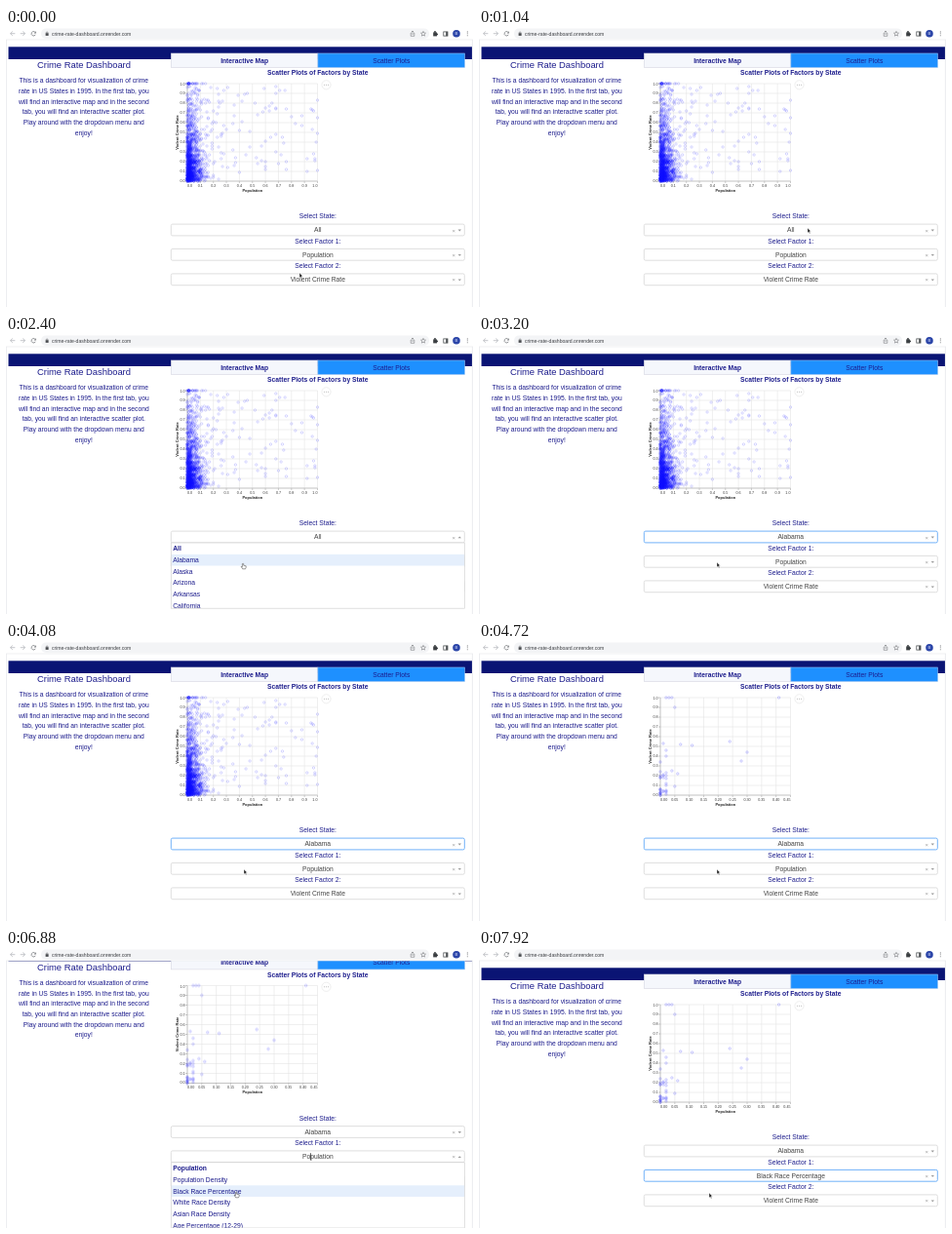
These frames come from a looping animation (479 by 286 pixels, 8000 ms). An HTML page with a canvas:

```html
<!DOCTYPE html>
<html lang="en">
<head>
<meta charset="utf-8">
<title>Crime Rate Dashboard</title>
<style>
html, body { margin: 0; width: 100%; height: 100%; overflow: hidden; background: #fff; }
canvas { display: block; width: 479px; height: 286px; }
</style>
</head>
<body>
<canvas id="stage"></canvas>
<script>
const W = 479, H = 286, LOOP = 8000, SCROLL = 19.5;
const OPEN1 = 1440, PICK1 = 2880, REDRAW = 4320, OPEN2 = 4800, PICK2 = 7280;
const STATUS = [5360, 5840];
const NAVY = '#1c1c8c', SANS = '"Liberation Sans", Arial, sans-serif';
const PLOT = { x: 186, y: 57, w: 133.5, h: 100 };
const STATES = ['All', 'Alabama', 'Alaska', 'Arizona', 'Arkansas', 'California'];
const FACTORS = ['Population', 'Population Density', 'Black Race Percentage',
  'White Race Density', 'Asian Race Density', 'Age Percentage (12-29)'];
const INTRO = ['This is a dashboard for visualization of crime',
  'rate in US States in 1995. In the first tab, you',
  'will find an interactive map and in the second',
  'tab, you will find an interactive scatter plot.',
  'Play around with the dropdown menu and', 'enjoy!'];

// Pointer stops: time, x, y
const PATH = [[0, 301, 251], [160, 301, 251], [960, 337, 205], [1480, 337, 205],
  [2200, 243, 234], [2880, 243, 234], [3040, 244, 233], [4840, 244, 233],
  [5360, 239, 245], [6240, 239, 245], [6800, 236, 249], [7280, 236, 249], [7360, 236, 250], [LOOP, 236, 250]];

const canvas = document.getElementById('stage');
const dpr = window.devicePixelRatio || 1;
canvas.width = W * dpr;
canvas.height = H * dpr;
const ctx = canvas.getContext('2d');

function rng(seed) {
  return () => {
    seed = (seed * 1664525 + 1013904223) >>> 0;
    return (seed + 0.5) / 4294967296;
  };
}

// Most places are small; a thin tail spreads over the whole plot
function allPoints() {
  const rand = rng(1995), pts = [];
  while (pts.length < 1500) {
    const tail = rand() < 0.085;
    const x = tail ? Math.pow(rand(), 1.6) * 1.03 : -Math.log(rand()) * 0.04;
    const y = tail ? 0.08 + rand() * 0.9 : -Math.log(rand()) * 0.25;
    pts.push([Math.min(1, Math.round(x * 100) / 100), Math.min(1, Math.round(y * 100) / 100)]);
  }
  return pts;
}

function statePoints() {
  const rand = rng(42);
  const pts = [[.02, 1], [.03, 1], [.04, 1], [.41, 1], [.05, .9], [.07, .52], [.11, .51], [.24, .55],
    [.28, .35], [.30, .44], [.06, .22], [.04, .25], [.05, .09], [.02, .46], [.01, .53], [.02, .4]];
  for (let i = 0; i < 28; i++) {
    pts.push([Math.floor(rand() * 2.6) / 100, Math.round(rand() * rand() * 40) / 100]);
  }
  return pts;
}

function scatter(pts, max, alpha) {
  const layer = document.createElement('canvas');
  layer.width = canvas.width;
  layer.height = canvas.height;
  const c = layer.getContext('2d');
  c.scale(dpr, dpr);
  c.strokeStyle = `rgba(20, 20, 255, ${alpha})`;
  c.lineWidth = 0.7;
  for (const [x, y] of pts) {
    c.beginPath();
    c.arc(PLOT.x + x / max * PLOT.w, PLOT.y + (1 - y) * PLOT.h, 1.2, 0, 7);
    c.stroke();
  }
  return layer;
}

const charts = {
  all: { max: 1, step: 0.1, digits: 1, layer: scatter(allPoints(), 1, 0.23) },
  state: { max: 0.45, step: 0.05, digits: 2, layer: scatter(statePoints(), 0.45, 0.3) }
};

function text(s, x, y, { size = 6.72, color = NAVY, align = 'center', bold = false } = {}) {
  ctx.font = `${bold ? 'bold ' : ''}${size}px ${SANS}`;
  ctx.fillStyle = color;
  ctx.textAlign = align;
  ctx.textBaseline = 'alphabetic';
  ctx.fillText(s, x, y + size * 0.35);
}

function rect(x, y, w, h, color) {
  ctx.fillStyle = color;
  ctx.fillRect(x, y, w, h);
}

function line(color, width, ...pts) {
  ctx.strokeStyle = color;
  ctx.lineWidth = width;
  ctx.beginPath();
  for (let i = 0; i < pts.length; i += 2) ctx.lineTo(pts[i], pts[i + 1]);
  ctx.stroke();
}

function shape(fill, ...pts) {
  ctx.beginPath();
  for (let i = 0; i < pts.length; i += 2) ctx.lineTo(pts[i], pts[i + 1]);
  ctx.closePath();
  ctx.fillStyle = fill;
  ctx.fill();
}

function disc(x, y, r, fill) {
  ctx.beginPath();
  ctx.arc(x, y, r, 0, 7);
  ctx.fillStyle = fill;
  ctx.fill();
}

function drawToolbar() {
  const ink = '#77797d', pale = '#b4b7bb';
  rect(0, 0, W, 12, '#fff');
  ctx.beginPath();
  ctx.roundRect(36, 0.5, 398, 10.5, 5);
  ctx.fillStyle = '#f3f4f6';
  ctx.fill();
  line('#e4e6e9', 0.6, 0, 12, W, 12);
  for (const [x, d] of [[4.5, 1], [19.5, -1]]) {
    line(pale, 0.8, x, 5.7, x + 4.8 * d, 5.7);
    line(pale, 0.8, x + 2.3 * d, 3.5, x, 5.7, x + 2.3 * d, 7.9);
  }
  ctx.strokeStyle = ink;
  ctx.lineWidth = 0.8;
  ctx.beginPath();
  ctx.arc(28.3, 5.8, 2.2, 0.5, 5.5);
  ctx.stroke();
  shape(ink, 30.8, 3.2, 30.8, 5.4, 28.6, 5.4);
  rect(40.6, 5.2, 3, 2.7, '#4a4c50');
  ctx.lineWidth = 0.7;
  ctx.beginPath();
  ctx.arc(42.1, 5, 1, Math.PI, 0);
  ctx.stroke();
  text('crime-rate-dashboard.onrender.com', 47, 5.9, { size: 5.1, color: '#3a3c40', align: 'left' });
  line(ink, 0.6, 415.8, 5, 415.2, 5, 415.2, 8.3, 418.8, 8.3, 418.8, 5, 418.2, 5);
  line(ink, 0.6, 417, 7, 417, 3);
  line(ink, 0.6, 415.9, 4.1, 417, 3, 418.1, 4.1);
  ctx.beginPath();
  for (let i = 0; i < 10; i++) {
    const a = i * Math.PI / 5 - Math.PI / 2, r = i % 2 ? 1.2 : 2.6;
    ctx.lineTo(428 + r * Math.cos(a), 6 + r * Math.sin(a));
  }
  ctx.closePath();
  ctx.stroke();
  rect(438.2, 4.4, 3.8, 4, '#3c4043');
  disc(440, 4.1, 1, '#3c4043');
  disc(442.2, 6.4, 0.9, '#3c4043');
  ctx.strokeStyle = '#4c5053';
  ctx.lineWidth = 0.8;
  ctx.strokeRect(448.8, 3.9, 4.2, 4.2);
  rect(451.2, 3.9, 1.8, 4.2, '#4c5053');
  disc(462, 5.8, 3.8, '#2b45a8');
  text('B', 462, 5.8, { size: 4.2, color: '#dfe5ff' });
  for (const y of [3.9, 5.8, 7.7]) disc(473.3, y, 0.55, ink);
}

function drawChart({ max, step, digits, layer }) {
  const { x, y, w, h } = PLOT, count = Math.round(max / step);
  const small = { size: 3.7, color: '#333' };
  for (let i = 0; i <= count; i++) {
    const gx = x + w * i / count;
    line('#dedede', 0.5, gx, y, gx, y + h);
    line('#999', 0.5, gx, y + h, gx, y + h + 2);
    const align = i === 0 ? 'left' : i === count ? 'right' : 'center';
    text((i * step).toFixed(digits), gx, y + h + 4.6, { ...small, align });
  }
  for (let i = 0; i <= 10; i++) {
    const gy = y + h * (1 - i / 10);
    line('#dedede', 0.5, x, gy, x + w, gy);
    line('#999', 0.5, x - 2, gy, x, gy);
    text((i / 10).toFixed(1), x - 2.4, gy + (i === 10 ? 0.8 : i === 0 ? -0.6 : 0), { ...small, align: 'right' });
  }
  line('#999', 0.5, x, y, x, y + h, x + w, y + h);
  ctx.drawImage(layer, 0, 0, W, H);
  const bold = { size: 4, color: '#222', bold: true };
  text('Population', x + w / 2, 166.2, bold);
  ctx.save();
  ctx.translate(176, 107);
  ctx.rotate(-Math.PI / 2);
  text('Violent Crime Rate', 0, 0, bold);
  ctx.restore();
  ctx.strokeStyle = '#e2e2e2';
  ctx.lineWidth = 0.6;
  ctx.beginPath();
  ctx.arc(328.5, 58.3, 4.6, 0, 7);
  ctx.stroke();
  for (const d of [-2, 0, 2]) disc(328.5 + d, 58.3, 0.55, '#b4b4b4');
}

function drawTab(label, x, fill, edge, bold) {
  rect(x, 26, 150.6, 14.4, fill);
  ctx.strokeStyle = edge;
  ctx.lineWidth = 0.6;
  ctx.strokeRect(x, 26, 150.6, 14.4);
  text(label, x + 75.3, 33.5, { bold });
}

function drawSelect(label, value, cy, focused, open) {
  text(label, 319.8, cy - 13.9);
  ctx.beginPath();
  ctx.roundRect(169.3, cy - 5.9, 301, 11.8, 1.5);
  ctx.fillStyle = '#fff';
  ctx.fill();
  ctx.strokeStyle = focused ? '#62aaf8' : '#d2d2d2';
  ctx.lineWidth = focused ? 0.9 : 0.7;
  ctx.stroke();
  text(value, 319.8, cy, { color: '#444' });
  text('×', 459.3, cy + 0.4, { size: 6, color: '#999' });
  const d = open ? -1 : 1;
  shape('#999', 463.6, cy - 0.8 * d + 0.4, 467, cy - 0.8 * d + 0.4, 465.3, cy + d + 0.4);
}

function drawMenu(items, cy, hover) {
  const top = cy + 6, row = 11.65, height = 67.2;
  ctx.save();
  ctx.beginPath();
  ctx.rect(169, top, 301.6, height);
  ctx.clip();
  rect(169, top, 302, height, '#fff');
  items.forEach((item, i) => {
    if (i === hover) rect(169.5, top + 0.2 + i * row, 301, row, '#e5effc');
    text(item, 171.2, top + 6.1 + i * row, { align: 'left', bold: i === 0 });
  });
  ctx.restore();
  ctx.strokeStyle = '#d2d2d2';
  ctx.lineWidth = 0.7;
  ctx.strokeRect(169.3, top, 301, height);
}

function drawCaret(age, cy) {
  if (age % 1000 < 500) rect(312, cy - 3.6, 0.7, 7.2, '#222');
}

function pointer(t) {
  const i = Math.max(1, PATH.findIndex(p => p[0] > t));
  const [t0, x0, y0] = PATH[i - 1], [t1, x1, y1] = PATH[i];
  const k = (t - t0) / (t1 - t0), e = k * k * (3 - 2 * k);
  return [x0 + (x1 - x0) * e, y0 + (y1 - y0) * e];
}

function drawPointer(x, y, hand) {
  ctx.save();
  ctx.translate(x, y);
  ctx.lineJoin = 'round';
  if (hand) {
    ctx.beginPath();
    ctx.moveTo(-0.6, 3.7);
    ctx.lineTo(-0.6, 0.5);
    ctx.quadraticCurveTo(0.1, -0.3, 0.7, 0.5);
    ctx.lineTo(0.7, 2.2);
    ctx.lineTo(3.2, 2.8);
    ctx.lineTo(3.1, 4.5);
    ctx.lineTo(2.5, 5.8);
    ctx.lineTo(-0.3, 5.8);
    ctx.lineTo(-1.8, 3.4);
    ctx.closePath();
    ctx.fillStyle = '#fff';
    ctx.strokeStyle = '#555';
    ctx.lineWidth = 0.6;
    ctx.fill();
    ctx.stroke();
  } else {
    shape('#222', 0, 0, 0, 5, 1.2, 4, 2, 5.8, 2.8, 5.4, 2, 3.6, 3.5, 3.6);
    ctx.strokeStyle = '#fff';
    ctx.lineWidth = 0.4;
    ctx.stroke();
  }
  ctx.restore();
}

function draw(t) {
  const open1 = t >= OPEN1 && t < PICK1, open2 = t >= OPEN2 && t < PICK2;
  const [px, py] = pointer(t);
  const top = open2 ? SCROLL : 0;
  const hover = cy => Math.max(0, Math.floor((py + top - cy - 6) / 11.65));
  ctx.setTransform(dpr, 0, 0, dpr, 0, 0);
  rect(0, 0, W, H, '#fff');

  ctx.save();
  ctx.translate(0, -top);
  rect(2.5, 19.3, 475.5, 12.7, '#0a1474');
  text('Crime Rate Dashboard', 80, 38, { size: 9.4 });
  INTRO.forEach((s, i) => text(s, 79.8, 54.1 + i * 10.65));
  drawTab('Interactive Map', 169.3, '#f5f7fc', '#d6d6e2', true);
  drawTab('Scatter Plots', 319.9, '#1e90ff', '#8fbdf0', false);
  text('Scatter Plots of Factors by State', 319.8, 45.9, { bold: true });
  drawChart(t < REDRAW ? charts.all : charts.state);
  drawSelect('Select State:', t < PICK1 ? 'All' : 'Alabama', 207, t >= PICK1 && t < OPEN2, open1);
  drawSelect('Select Factor 1:', t < PICK2 ? 'Population' : 'Black Race Percentage', 232.3, t >= PICK2, open2);
  drawSelect('Select Factor 2:', 'Violent Crime Rate', 257.8, false, false);
  if (open1) {
    drawCaret(t - OPEN1, 207);
    drawMenu(STATES, 207, hover(207));
  }
  if (open2) {
    drawCaret(t - OPEN2, 232.3);
    drawMenu(FACTORS, 232.3, hover(232.3));
  }
  ctx.restore();

  line('#dcdfe4', 0.6, 0.4, 12, 0.4, H);
  line('#dcdfe4', 0.6, 478.4, 12, 478.4, H);
  drawToolbar();
  if (t >= STATUS[0] && t < STATUS[1]) {
    rect(0, 279, 160, 7, '#dcdee1');
    line('#b8bbbf', 0.5, 0, 279, 160, 279, 160, H);
    text('Waiting for crime-rate-dashboard.onrender.com...', 2, 282.6, { size: 4.25, color: '#55585c', align: 'left' });
  }
  const boxBottom = open1 ? 213 : 238.3 - top;
  drawPointer(px, py, (open1 || open2) && py > boxBottom);
}

const start = performance.now();
function tick() {
  draw((performance.now() - start) % LOOP);
  requestAnimationFrame(tick);
}
tick();
</script>
</body>
</html>
```
